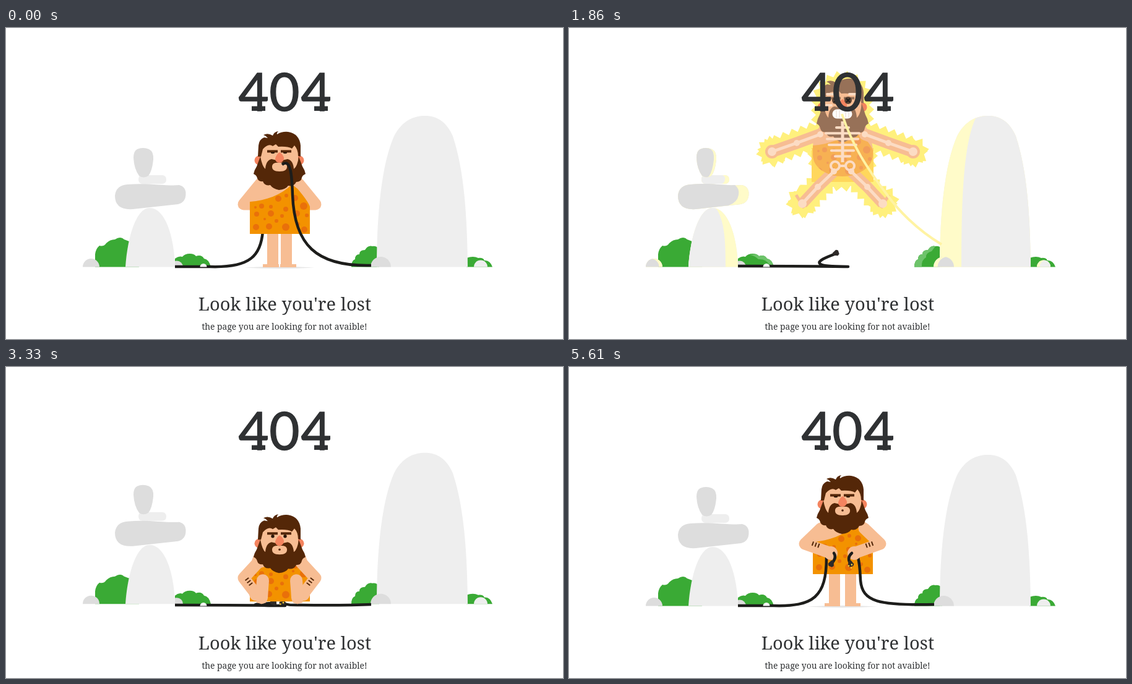
These frames come from a looping animation (900x503 px, 5720 ms). An HTML page with a canvas:

```html
<!DOCTYPE html>
<html lang="en">
<head>
<meta charset="utf-8">
<title>404</title>
<style>
  html, body { margin: 0; width: 100%; height: 100%; overflow: hidden; background: #fff; }
  canvas, svg { position: absolute; left: 0; top: 0; display: block; }
  text { fill: #2f3133; }
  .code { font: 85px Lato, "Open Sans", sans-serif; stroke: #2f3133; stroke-width: 1.3; }
  .title { font: 29px "Noto Serif", serif; text-anchor: middle; letter-spacing: .1px; }
  .note { font: 13.85px "Noto Serif", serif; text-anchor: middle; }
</style>
</head>
<body>
<canvas id="stage" width="900" height="503"></canvas>
<svg width="900" height="503" viewBox="0 0 900 503">
  <text class="code" x="375.5 425.3 476.5" y="134">404</text>
  <path fill="#2f3133" d="M397 126.500h22v7.500h-22zM498 126.500h22v7.500h-22z"/>
  <text class="title" x="450.5" y="457">Look like you're lost</text>
  <text class="note" x="450" y="488">the page you are looking for not avaible!</text>
</svg>
<script>
const ctx = document.getElementById('stage').getContext('2d');
const LOOP = 5720, SHOCK = 1100, RELEASE = 2700, LAND = 3290, RISE = 4710;
const SKIN = '#f7bd93', BLUSH = '#f4845f', HAIR = [84, 39, 8], TUNIC = [243, 146, 0], SPOT = [233, 112, 10];
const GREY = '#dddddd', PALE = '#eeeeee', GREEN = '#3aaa35', LIGHT = '#fffbc9', WIRE = '#1d1d1b', BONE = '#fcdcc4';

const clamp = v => Math.max(0, Math.min(1, v));
const ramp = (t, a, b) => clamp((t - a) / (b - a));
const arc = (t, a, b) => Math.sin(Math.PI * ramp(t, a, b));
const mirror = a => a.map((v, i) => i % 2 ? v : 884 - v);

function fill(color, d) { ctx.fillStyle = color; ctx.fill(new Path2D(d)); }
function line(color, width, d, cap = 'butt') {
  ctx.strokeStyle = color; ctx.lineWidth = width; ctx.lineCap = cap; ctx.lineJoin = 'round';
  ctx.stroke(new Path2D(d));
}
function dot(color, x, y, r) {
  ctx.fillStyle = color; ctx.beginPath(); ctx.arc(x, y, r, 0, 7); ctx.fill();
}
function dome(color, x, r) {
  ctx.fillStyle = color; ctx.beginPath(); ctx.arc(x, 386.5, r, Math.PI, 0); ctx.fill();
}
function moved(dx, dy, draw) { ctx.save(); ctx.translate(dx, dy); draw(); ctx.restore(); }

// Keys are [time, values, power]; power shapes the approach to that key.
function track(keys, t) {
  let i = keys.findIndex(k => k[0] > t);
  if (i < 0) return keys[keys.length - 1][1];
  const [t0, a] = keys[i - 1], [t1, b, power = 1] = keys[i];
  const u = ((t - t0) / (t1 - t0)) ** power;
  return a.map((v, k) => v + (b[k] - v) * u);
}

// Pose: head shift, body shift, two arms (3 points), two legs (hip, knee, ankle, heel, toe).
const pose = (head, body, arm, leg, armR = mirror(arm), legR = mirror(leg)) => [head, body, ...arm, ...armR, ...leg, ...legR];
const standLeg = [431, 325, 431, 355, 431, 386, 441, 384.5, 415, 384.5];
const bite = pose(0, 0, [411, 252, 384, 285, 400, 285], standLeg);
const shock = pose(-86, -91, [406, 172, 368, 186, 328, 200], [428, 232, 402, 257, 377, 284, 380, 291, 367, 270]);
const fly = pose(-99, -96, [408, 150, 381, 129, 335, 136], [404, 222, 394, 226, 394, 264, 403, 264, 378, 266],
  [476, 150, 499, 127, 543, 130], [468, 210, 490, 218, 521, 232, 522, 239, 522, 212]);
const sit = pose(78, 53, [408, 322, 384, 348, 404, 374], [415, 352, 414, 365, 413, 380, 407, 386, 418, 386]);
const hold = pose(8, 2, [407, 261, 381, 286, 423, 301], [429, 325, 429, 355, 429, 386, 438, 384.5, 413, 384.5]);
const poses = [[0, bite], [SHOCK, bite], [1160, shock], [RELEASE, shock], [2760, fly],
  [3030, fly], [LAND, sit, 2], [RISE, sit], [4890, hold, .7]];

const wire = (...p) => p;
const rightFlat = wire(590, 384, 545, 386, 480, 385, 470, 385, 460, 385, 455, 385, 447, 382);
const rightBite = wire(590, 384, 500, 386, 466, 350, 463, 270, 462, 238, 460, 210, 446, 221);
const rightLit = wire(602, 350, 560, 325, 530, 292, 515, 271, 480, 225, 457, 188, 441, 139);
const rightDrop = wire(590, 384, 540, 386, 420, 388, 414, 379, 425, 365, 525, 345, 449, 304);
const rightHold = wire(590, 384, 500, 386, 474, 380, 471, 345, 470, 325, 470, 320, 467, 308);
const leftBite = wire(273, 386, 290, 386, 310, 386, 330, 386, 395, 388, 412, 368, 415, 328);
const leftWhip = wire(273, 385, 330, 385, 400, 385, 451, 386, 390, 386, 395, 378, 431, 365);
const leftFlat = wire(273, 385, 330, 385, 400, 385, 451, 386, 390, 386, 390, 384, 432, 382);
const leftHold = wire(273, 386, 290, 386, 310, 386, 330, 386, 395, 388, 416, 372, 416, 308);
const rights = [[0, rightBite], [SHOCK, rightBite], [1160, rightLit], [RELEASE, rightLit],
  [3000, rightDrop], [3170, rightFlat, 1.4], [RISE, rightFlat], [4890, rightHold]];
const lefts = [[0, leftBite], [SHOCK, leftBite], [1860, leftWhip], [2020, leftFlat],
  [RISE, leftFlat], [4890, leftHold]];

const spots = '440 276 5,453 271 3,467 275 5,413 288 4,403 290 2,428 289 3,481 288 6,464 284 2,428 300 5,405 301 4,452 293 4,446 304 3,470 300 5,486 303 3,418 309 2,437 312 3,425 321 5,404 322 5,452 322 6,472 317 3,482 326 5'
  .split(',').map(s => s.split(' ').map(Number));

function mix(rgb, lit) {
  const to = [252, 224, 208];
  return `rgb(${rgb.map((v, i) => Math.round(v + (to[i] - v) * .4 * lit))})`;
}

const rocks = [
  [PALE, 'M193 386.500C196 340 210 291 232 291C258 291 272 340 273 386.500Z',
    'M193 386.500C196 340 210 291 232 291Q238 290 241 297C252 318 253 350 253 386.500Z'],
  [PALE, 'M219 238H253Q259 239 259 245Q259 252 252 252H220Q214 251 214 245Q214 239 219 238Z',
    'M219 238H248Q253 240 252 245Q251 252 246 252H220Q214 251 214 245Q214 239 219 238Z'],
  [GREY, 'M197 253C230 250 260 256 280 254Q291 257 290.500 269Q290 282 278 285L205 293Q176 295 176 271Q178 254 197 253Z',
    'M197 253C230 250 250 255 268 254Q276 260 274 270Q272 282 258 287L205 293Q176 295 176 271Q178 254 197 253Z'],
  [GREY, 'M212 196Q221 192 231 196Q239 200 238 213Q236 232 230 239Q222 244 215 239Q207 228 206 210Q206 199 212 196Z',
    'M212 196Q221 192 229 196Q235 200 234 213Q232 232 226 240Q222 243 215 239Q207 228 206 210Q206 199 212 196Z'],
  [PALE, 'M599 386.500C599 300 607 220 627 175C640 149 660 142 677 142C697 142 712 152 722 175C740 230 745 300 746 386.500Z',
    'M634 386.500C634 290 636 190 657 146Q667 142 677 142C697 142 712 152 722 175C740 230 745 300 746 386.500Z']
];

function pebble(color, x, r, side, lit) {
  dome(color, x, r);
  if (!lit) return;
  ctx.save();
  ctx.globalAlpha = lit;
  dome(LIGHT, x, r);
  ctx.restore();
  ctx.save();
  ctx.beginPath(); ctx.arc(x, 386.5, r, Math.PI, 0); ctx.clip();
  dome(color, x - side * r * .4, r);
  ctx.restore();
}

function scenery(lit, hop, shake) {
  moved(0, -shake, () => {
    fill(GREEN, 'M144 386.500V366Q145 357 151 352Q158 354 162 348Q168 342 176 342Q185 336 191 342Q198 345 203 346L215 386.500Z');
    fill(GREEN, 'M273 386.500V373Q279 368 285 370Q289 365 297 365Q304 365 307 369Q316 366 320 373Q328 374 331 386.500Z');
    fill(GREEN, 'M558 386.500Q558 376 564 374Q564 366 571 366Q571 359 580 359Q585 351 592 353Q599 352 603 358V386.500Z');
    fill(GREEN, 'M744 386.500V372Q755 368 763 372Q771 371 773 376Q782 375 786 386.500Z');
    if (lit) {
      ctx.globalAlpha = lit;
      fill('#6dc36a', 'M292 367Q302 364 307 369Q316 366 320 373Q328 374 331 386L324 383Q318 373 306 374Q300 368 292 367Z');
      fill('#6dc36a', 'M558 386.500Q558 376 564 374Q564 366 571 366Q571 359 580 359Q585 351 592 353L586 361Q576 364 577 371Q569 375 570 386.500Z');
      ctx.globalAlpha = 1;
    }
  });
  moved(0, -hop, () => {
    for (const [color, whole, shade] of rocks) {
      fill(color, whole);
      if (!lit) continue;
      ctx.globalAlpha = lit; fill(LIGHT, whole);
      ctx.globalAlpha = 1; fill(color, shade);
    }
  });
  moved(0, -shake, () => {
    pebble(GREY, 137.5, 13.5, 1, lit);
    pebble(GREY, 605.5, 16.5, -1, lit);
    pebble(PALE, 767, 11, -1, lit);
    ctx.save();
    ctx.beginPath(); ctx.rect(273, 370, 14, 16.5); ctx.clip();
    dome(GREY, 276, 10);
    ctx.restore();
  });
}

const curve = p => `M${p[0]} ${p[1]}C${p.slice(2, 8)}C${p.slice(8)}`;
function plug(x, y, angle) {
  ctx.save();
  ctx.translate(x, y); ctx.rotate(angle);
  fill('#2e2a28', 'M-5 -2L2 -5L5 -3V3L2 5L-5 2Z');
  ctx.restore();
}
function sparks(x, y, t) {
  const n = Math.floor(t / 60);
  for (let i = 0; i < 3; i++) {
    const a = n * 2.4 + i * 2.1;
    dot('#f7d038', x + 3 * Math.cos(a), y + 3 * Math.sin(a), 1.3);
  }
}
function cable(p, color, width, tip) {
  line(color, width, curve(p));
  if (tip) plug(p[12], p[13] - 1, Math.atan2(p[13] - p[11], p[12] - p[10]));
}

// Capsule with a toothed edge.
function spiky(x1, y1, x2, y2, r, shift) {
  const len = Math.hypot(x2 - x1, y2 - y1), a = Math.atan2(y2 - y1, x2 - x1);
  const half = len + Math.PI * r, n = 2 * Math.round(half / 7.5);
  ctx.beginPath();
  for (let i = 0; i < n; i++) {
    let s = (i + shift) / n * 2 * half % (2 * half);
    const back = s >= half;
    if (back) s -= half;
    const dir = back ? a + Math.PI : a, [bx, by] = back ? [x2, y2] : [x1, y1];
    const along = Math.min(s, len), angle = dir - Math.PI / 2 + Math.max(0, s - len) / r;
    const out = r + (i % 2 ? 7 : -1);
    ctx.lineTo(bx + along * Math.cos(dir) + out * Math.cos(angle), by + along * Math.sin(dir) + out * Math.sin(angle));
  }
  ctx.fill();
}

function aura(p, arms, legs, lit, t) {
  const shift = Math.floor(t / 59) % 2 ? .6 : 0, h = p[0], b = p[1];
  ctx.save();
  ctx.globalAlpha = lit;
  ctx.fillStyle = '#fff07d';
  spiky(442, 206 + h, 442, 231 + h, 44, shift);
  spiky(442, 286 + b, 442, 299 + b, 50, shift);
  for (const a of arms) {
    spiky(a[0], a[1], a[4], a[5], 17, shift);
    spiky(a[4], a[5], a[4] + .1, a[5], 19, shift);
  }
  for (const l of legs) {
    spiky(l[0], l[1], l[4], l[5], 17, shift);
    spiky(l[4], l[5] - 3, l[4] + .1, l[5] - 3, 20, shift);
  }
  fill('#ffd75c', `M392 ${285 + b}H492V${340 + b}H392Z`);
  ctx.restore();
}

const joint = a => `M${a[0]} ${a[1]}L${a[2]} ${a[3]}L${a[4]} ${a[5]}`;

function drawArm(a, marks, brown) {
  line(SKIN, 19, joint(a), 'round');
  dot(SKIN, a[4], a[5], 11);
  if (!marks) return;
  const ang = Math.atan2(a[5] - a[3], a[4] - a[2]);
  const x = a[2] + .42 * (a[4] - a[2]), y = a[3] + .42 * (a[5] - a[3]) - 5;
  for (let i = -1; i < 2; i++) {
    const cx = x + 5 * i * Math.cos(ang), cy = y + 5 * i * Math.sin(ang);
    const nx = -3.5 * Math.sin(ang), ny = 3.5 * Math.cos(ang);
    line(brown, 2, `M${cx - nx} ${cy - ny}L${cx + nx} ${cy + ny}`);
  }
}

function drawLeg(l, round) {
  line(SKIN, round ? 20 : 18, joint(l), round ? 'round' : 'butt');
  line(SKIN, 5, `M${l[6]} ${l[7]}L${l[8]} ${l[9]}`, round ? 'round' : 'butt');
}

function torso(round, lit) {
  fill(SKIN, 'M412 240Q395 262 394 283V300H491V289Q489 262 473 240Z');
  const shape = 'M394 281C420 279 445 270 462 253L471 260Q488 280 491 289' +
    (round ? 'V296C491 318 465 331 442 331C418 331 394 318 394 296Z' : 'V333H394Z');
  fill(mix(TUNIC, lit), shape);
  ctx.save();
  ctx.clip(new Path2D(shape));
  for (const [x, y, r] of spots) dot(mix(SPOT, lit), x, y, r);
  ctx.restore();
}

function head(f, lit) {
  const brown = mix(HAIR, lit);
  dot(BLUSH, 409, 214, 7.5);
  dot(BLUSH, 474, 214, 7.5);
  fill(SKIN, 'M411 183H472V225Q470 245 442 245Q414 245 411 225Z');
  const crown = f.wild
    ? 'Q411 176 419 170L421 160L431 168L440 159H453L450 166L457 165L469 168L462 175Q474 180 476 190'
    : 'Q409 180 417 177L423 178Q420 174 416 173Q423 169 431 174Q433 168 440 167Q437 170 438 172Q446 167 456 168Q474 171 476 190';
  fill(brown, 'M407 208L408 190' + crown +
    'V208L472 207Q472 196 466 190L462 195Q455 191 440 192L436 188L431 191Q424 186 415 196L412 208Z');
  ctx.save();
  ctx.translate(0, 208); ctx.scale(1, f.jaw); ctx.translate(0, -208);
  fill(brown, 'M411 208L405 224Q401 230 400 236Q405 238 406 243Q408 249 415 248Q418 256 427 254Q431 260 441 262Q452 261 456 255Q465 257 469 249Q477 249 478 242Q479 238 484 236Q483 230 479 224L473 208Q471 224 465 228Q464 214 455 212L442 215L429 212Q420 214 419 228Q414 224 411 208Z');
  ctx.restore();
  moved(0, -f.chew, () => fill(SKIN, 'M430 223Q431 217 442 218Q453 217 454 223Q455 232 442 232Q429 232 430 223Z'));
  if (f.lips) dot(brown, 442, 224, 1.8);
  fill(BLUSH, 'M442 201C446 203 450 209 449 212Q447 218 441 218Q435 217 435 211Q437 204 442 201Z');
  fill(brown, `M422 ${197.5 + f.browL}h17v4h-17zM444 ${197.5 + f.browR}h17v4h-17z`);
  [[431, f.eyeL], [451, f.eyeR]].forEach(([x, open]) => {
    if (open) dot('#2b1709', x, 202.5, 2.7);
    else fill('#2b1709', `M${x - 3} 201h6v1.500q-3 1.500 -6 0z`);
  });
}

function skeleton(p, arms, legs, lit, open) {
  ctx.save();
  ctx.globalAlpha = lit;
  for (const limb of [...arms, ...legs]) {
    line(BONE, 5, joint(limb), 'round');
    for (let i = 0; i < 6; i += 2) dot(BONE, limb[i], limb[i + 1], i === 4 ? 7 : 5);
  }
  moved(0, p[1], () => {
    line(BONE, 5, 'M442 242V308');
    for (let i = 0; i < 6; i++) {
      const w = [10, 27, 25, 22, 18, 12][i], y = 252 + i * 9.3;
      line(BONE, 4, `M${442 - w} ${y}H${442 + w}`, 'round');
    }
    line(BONE, 4, 'M423 314a7 7 0 1 0 14 0a7 7 0 1 0 -14 0M447 314a7 7 0 1 0 14 0a7 7 0 1 0 -14 0M437 314H447');
  });
  moved(0, p[0], () => {
    line(BONE, 4, 'M417 193H429M453 193H464M416 211H424M459 211H466', 'round');
    for (const x of [431, 451]) {
      dot('#5b4334', x, 203, 6);
      line('#1d1d1b', 2, `M${x - 3} 200l6 6m0 -6l-6 6`);
    }
    line('#ffffff', 15, 'M433 225H450', 'round');
    line('#e6d6cc', 1, 'M432 219V231M437 219V231M447 219V231M452 219V231');
    if (open) fill('#111111', 'M428 221h28v8h-28z');
  });
  ctx.restore();
}

function frame(t) {
  const lit = t >= SHOCK && t < RELEASE ? .75 + .25 * Math.cos(2 * Math.PI * (t - 1860) / 118) : 0;
  const biting = t < SHOCK, flying = t >= RELEASE && t < LAND, sitting = t >= 3200 && t < 4770;
  const holding = t >= RISE, held = t >= 4850;
  const p = track(poses, t);
  const arms = [p.slice(2, 8), p.slice(8, 14)], legs = [p.slice(14, 24), p.slice(24, 34)];
  const chew = biting ? (1 - Math.cos(2 * Math.PI * t / 280)) / 2 : 0;
  const left = track(lefts, t), right = track(rights, t).slice();
  if (biting) [[6, -2], [8, -2], [12, -2], [13, -3]].forEach(([i, d]) => right[i] += d * chew);
  const raise = biting ? ramp(t, 640, 760) : 0;
  const blink = arc(t, 4080, 4200) > .3 || arc(t, 4300, 4420) > .3;
  const seated = t >= LAND && t < RISE;
  const face = {
    wild: flying, lips: t >= RELEASE, jaw: lit ? 1.16 : 1, chew,
    browL: seated ? -1.5 : 2 * raise, browR: seated ? -1.5 : -5 * raise,
    eyeL: seated && !blink, eyeR: (seated && !blink) || flying || raise > .5
  };
  const bounce = 9 * arc(t, LAND, 3440) + 3 * arc(t, 3440, 3540) + 26 * arc(t, 4800, 5060);
  const brown = mix(HAIR, lit);

  ctx.clearRect(0, 0, 900, 503);
  const jolt = 4 * arc(t, LAND, 3420) + 1.5 * arc(t, 3420, 3520);
  scenery(lit, jolt, jolt + arc(t, 5060, 5160));
  if (biting || held) fill('#e6e6e6', 'M384 387.500Q442 384 499 387.500Q442 391 384 387.500Z');

  const wires = () => {
    cable(left, WIRE, 4.5, t >= SHOCK && !held);
    if (t >= RELEASE) {
      cable(right, WIRE, 4.5, !held);
      if (!held) sparks(right[12] - 2, right[13] - 1, t);
    }
  };
  if (!holding) wires();

  moved(0, -bounce, () => {
    if (lit) aura(p, arms, legs, lit, t);
    if (!sitting) legs.forEach(l => drawLeg(l, false));
    if (biting) arms.forEach(a => drawArm(a, false, brown));
    moved(0, p[1], () => torso((lit || flying) && !sitting, lit));
    if (holding) moved(0, bounce, wires);
    if (!biting) arms.forEach(a => drawArm(a, t >= RELEASE, brown));
    if (sitting) legs.forEach(l => drawLeg(l, true));
    if (held) {
      line(WIRE, 4.5, 'M428 301Q433 308 425 317M457 301Q449 308 454 317', 'round');
      plug(424, 318, 2);
      plug(455, 318, 1.3);
      sparks(455, 322, t);
    }
    moved(0, p[0], () => head(face, lit));
    if (lit) skeleton(p, arms, legs, lit, Math.floor(t / 236) % 2 === 0);
  });

  if (biting) cable(right, WIRE, 4.5, false);
  else if (lit) cable(right, '#fff3a3', 4, false);
  dome('#f6f6f6', 319, 5.5);
}

const start = performance.now();
(function tick() {
  frame((performance.now() - start) % LOOP);
  requestAnimationFrame(tick);
})();
</script>
</body>
</html>
```
